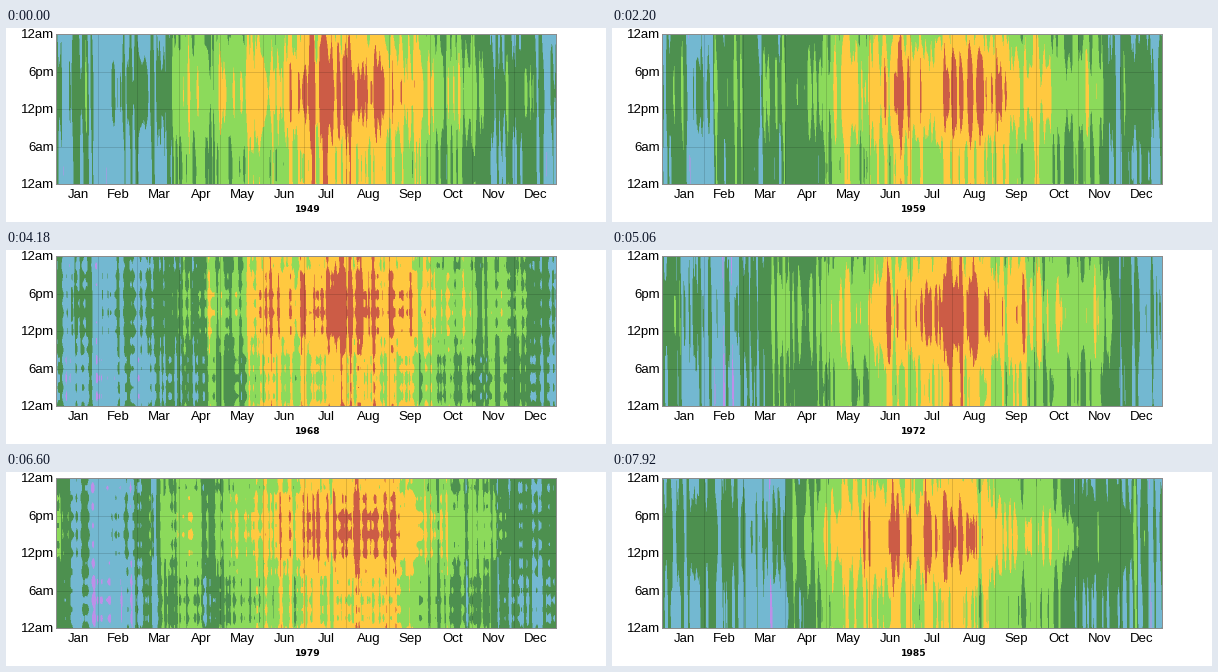
A matplotlib script that plays this animation: 600 px wide and 194 px high, repeating every 8 s.

```python
import numpy as np
import matplotlib.pyplot as plt
from matplotlib.animation import FuncAnimation

W, H = 600, 194
LEFT, TOP, RIGHT, BOTTOM = 50, 6, 550, 156
FIRST, YEARS = 1949, 37
STEP, FRAMES, TICK = 220, 400, 20
SS = 2  # supersampling of the contour edges

MONTHS = "Jan Feb Mar Apr May Jun Jul Aug Sep Oct Nov Dec".split()
STARTS = np.arange("1949-01", "1950-02", dtype="M8[M]").astype("M8[D]").astype(int)
STARTS -= STARTS[0]
HOURS = ["12am", "6pm", "12pm", "6am", "12am"]

# one colour per temperature band, cold to hot
BANDS = np.array([(189, 143, 232), (115, 184, 209), (77, 144, 79),
                  (140, 218, 91), (255, 201, 64), (204, 92, 70)], float)


def sparse_readings(year):
    """Years read only every three hours show horizontal banding."""
    return 1965 <= year <= 1971 or 1973 <= year <= 1980


def noise(rng, n, spread, width):
    """Random daily values smoothed over about `width` days."""
    k = np.arange(-30, 31)
    kernel = np.exp(-(k / width) ** 2 / 2)
    kernel /= np.sqrt((kernel ** 2).sum())
    return spread * np.convolve(rng.normal(size=n + 60), kernel, "valid")


def temperature(year):
    rng = np.random.default_rng(year)
    day = np.arange(367)
    season = np.cos(2 * np.pi * (day - 207) / 365)
    peak = 3.5 + 1.5 * season + 0.2 * season ** 2
    peak += noise(rng, day.size, .25, 7) + noise(rng, day.size, .38, .65)
    swing = (0.75 + 0.35 * season) * rng.uniform(.6, 1.3, day.size)
    ripple = rng.uniform(0, .3, day.size)

    nx, ny = (RIGHT - LEFT - 1) * SS, (BOTTOM - TOP - 1) * SS
    x = (np.arange(nx) + .5) / nx * 365
    hour = (24 * (1 - (np.arange(ny) + .5) / ny))[:, None]
    t = x + hour / 24
    sparse = sparse_readings(year)
    warmest = 16 if sparse else 14.7
    cycle = (np.cos(2 * np.pi * (hour - warmest) / 24) - 1) / 2
    temp = np.interp(t, day, peak) + cycle * np.interp(x, day, swing)
    if sparse:
        temp += np.cos(2 * np.pi * hour / 3) * np.interp(x, day, ripple)
    return temp


def render(year):
    band = np.clip(np.floor(temperature(year)), 0, 5).astype(int)
    ny, nx = band.shape
    chart = BANDS[band].reshape(ny // SS, SS, nx // SS, SS, 3).mean(axis=(1, 3))
    page = np.full((H, W, 3), 255.0)
    page[TOP:BOTTOM + 1, LEFT:RIGHT + 1] = 140
    page[TOP + 1:BOTTOM, LEFT + 1:RIGHT] = chart
    for start in STARTS[1:-1]:
        page[TOP + 1:BOTTOM, LEFT + round(start * 500 / 365)] *= .87
    for y in (44, 81, 119):
        page[y, LEFT + 1:RIGHT] *= .87
    return page.astype(np.uint8)


pages = [render(FIRST + i) for i in range(YEARS)]

fig = plt.figure(figsize=(W / 100, H / 100), dpi=100, facecolor="white")
chart = fig.figimage(pages[0], origin="upper")


def label(x, y, text, px, **style):
    return fig.text(x / W, 1 - y / H, text, fontsize=px * .72, va="baseline", **style)


for i, name in enumerate(MONTHS):
    mid = (STARTS[i] + STARTS[i + 1]) / 2
    label(51 + mid * 500 / 365, 170, name, 13.3, ha="center", family="Liberation Sans")
for i, name in enumerate(HOURS):
    label(48, TOP + 4.5 + i * 37.5, name, 13.3, ha="right", family="Liberation Sans")
caption = label(301.5, 184, str(FIRST), 9.2, ha="center", family="DejaVu Sans", weight="bold")


def update(k):
    i = k * TICK // STEP
    chart.set_data(pages[i])
    caption.set_text(str(FIRST + i))
    return chart, caption


anim = FuncAnimation(fig, update, frames=FRAMES, interval=TICK, repeat=True, repeat_delay=0)
plt.show()
```
